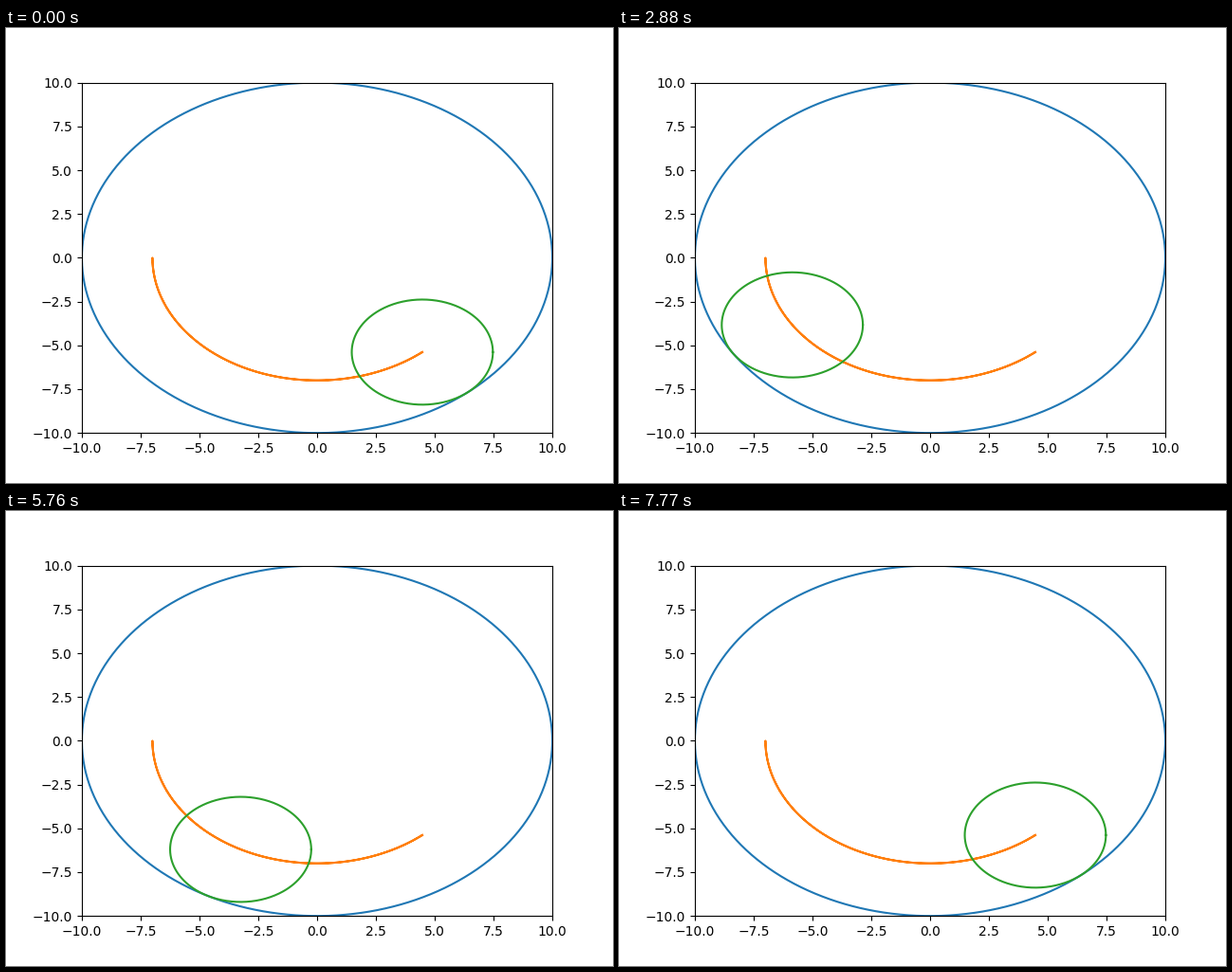
A matplotlib script for the animation above (7.8 s loop, 640 by 480 pixels).

```python
import numpy as np
import matplotlib.pyplot as plt
from matplotlib.animation import FuncAnimation

OUTER, INNER = 10, 3
STEPS = 130                      # positions in one sweep
TURN = np.linspace(0, 2 * np.pi, 360)


def circle(radius, cx=0.0, cy=0.0):
    return cx + radius * np.cos(TURN), cy + radius * np.sin(TURN)


# The small circle's centre swings down to the left, then back
sweep = -np.pi + np.linspace(0, np.pi, 180)[:STEPS]
angles = np.concatenate([sweep[::-1], sweep])
track_x = (OUTER - INNER) * np.cos(angles)
track_y = (OUTER - INNER) * np.sin(angles)

fig, ax = plt.subplots(figsize=(6.4, 4.8), dpi=100)
ax.set_xlim(-OUTER, OUTER)
ax.set_ylim(-OUTER, OUTER)
ax.plot(*circle(OUTER), color="C0")
ax.plot(track_x, track_y, color="C1")
roller, = ax.plot(*circle(INNER, track_x[0], track_y[0]), color="C2")


def update(i):
    roller.set_data(*circle(INNER, track_x[i], track_y[i]))
    return roller,


anim = FuncAnimation(fig, update, frames=len(angles), interval=30,
                     repeat=True, repeat_delay=0)
plt.show()
```
